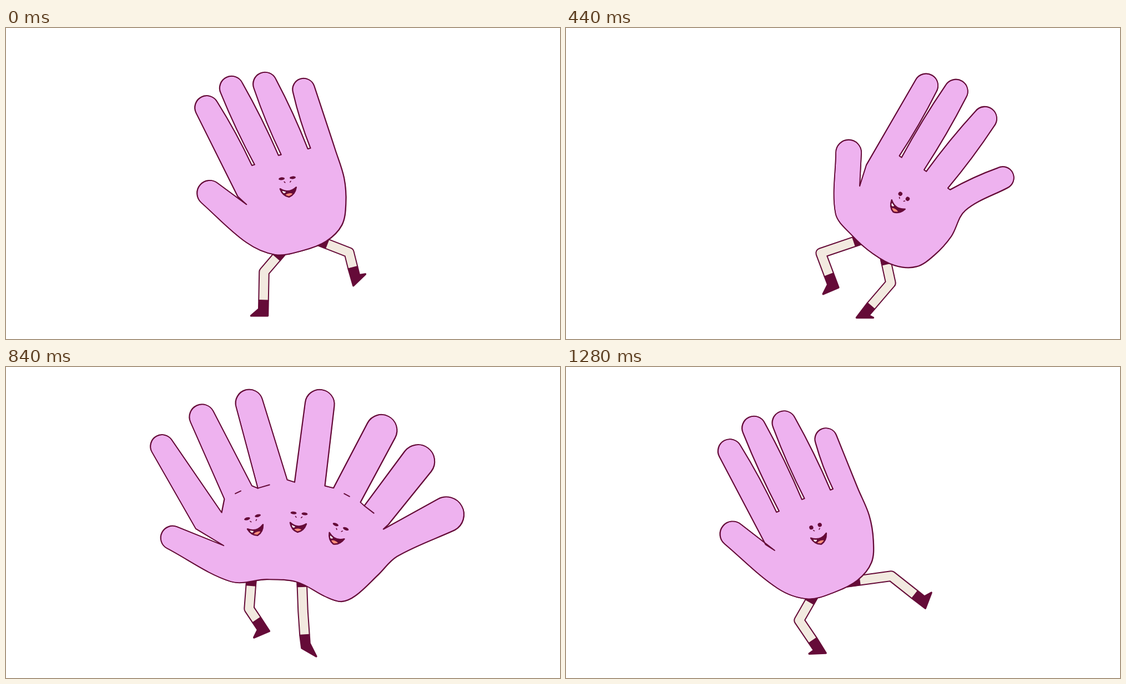
Write an HTML page with a canvas that moves like this. It is 998 by 561 pixels and loops after 1360 ms.

```html
<!DOCTYPE html>
<html lang="en">
<head>
<meta charset="utf-8">
<title>Walking hand</title>
<style>
html, body { margin: 0; width: 100%; height: 100%; overflow: hidden; background: #fff; }
canvas { display: block; width: 100vw; height: 100vh; }
</style>
</head>
<body>
<canvas id="stage"></canvas>
<script>
const W = 998, H = 561, LOOP = 1360;
const INK = '#650b38', SKIN = '#eeb2ef', BONE = '#f2eae0', TONGUE = '#ff8f7c';
const canvas = document.getElementById('stage');
const ctx = canvas.getContext('2d');
const ratio = window.devicePixelRatio || 1;
canvas.width = W * ratio;
canvas.height = H * ratio;

const rad = deg => deg * Math.PI / 180;
const add = (p, d, n) => [p[0] + d[0] * n, p[1] + d[1] * n];
const gap = (a, b) => Math.hypot(b[0] - a[0], b[1] - a[1]);
const unit = (a, b) => [(b[0] - a[0]) / (gap(a, b) || 1), (b[1] - a[1]) / (gap(a, b) || 1)];
const heading = deg => [Math.cos(rad(deg)), Math.sin(rad(deg))];
const place = ([x, y], [ox, oy], deg) => {
  const [c, s] = heading(deg);
  return [ox + x * c - y * s, oy + x * s + y * c];
};

// Blend numbers, lists and whole poses alike.
function mix(a, b, k) {
  if (typeof a === 'number') return a + (b - a) * k;
  if (Array.isArray(a)) return a.map((v, i) => mix(v, b[i], k));
  return Object.fromEntries(Object.keys(a).map(n => [n, mix(a[n], b[n], k)]));
}

// The hand hangs on the gap between its middle fingers (at). A pose gives the tilt,
// the finger angles and lengths, the height of the thumb, the face (x, y, roll)
// and for each leg the knee, ankle and direction of the sole.
const start = {
  at: [493, 229], tilt: -16.6, bend: [-12, -9.6, -7, -0.5], stretch: 0.95, little: 111, thumb: 30,
  face: [1, 44, 11], squint: 1,
  legs: [[465, 440, 464, 492, 180], [618, 405, 625, 433, -44]]
};
const upright = {
  at: [553, 218], tilt: 10.6, bend: [-15, -3.7, 2.5, 11], stretch: 0.93, little: 102, thumb: 57,
  face: [-4, 57, 0], squint: 0,
  legs: [[485, 430, 475, 474, 176], [571, 428, 559, 482, -25]]
};
const lean = {
  at: [647, 257], tilt: 33.5, bend: [-3.5, -3, 4.5, 32], stretch: 1, little: 90, thumb: 49,
  face: [-6, 60, 1], squint: 0,
  legs: [[459, 406, 474, 446, 157], [585, 460, 549, 502, 0]]
};
const reach = {
  at: [684, 313], tilt: 50, bend: [-1.6, -1, 10, 24.6], stretch: 1.06, little: 115, thumb: 38,
  face: [-9, 48, 0], squint: 0,
  legs: [[479, 411, 492, 442, 155], [582, 480, 551, 503, 0]]
};
const kick = {
  at: [390, 229], tilt: -37.3, bend: [-7.8, -3.3, 2.7, 3], stretch: 1, little: 89, thumb: 13,
  face: [-21, 51, 3], squint: 0,
  legs: [[427, 460, 447, 499, 183], [551, 342, 583, 348, -80]]
};
const settle = {
  at: [427, 238], tilt: -22.5, bend: [-5.8, -3, -2.5, 2], stretch: 1.015, little: 94, thumb: 10,
  face: [2, 54, 5], squint: 0,
  legs: [[420, 457, 445, 494, 178], [586, 377, 629, 411, -69]]
};
const smear = {
  caps: [[281, 143], [353, 90], [438, 65], [565, 67], [676, 114], [742, 170], [793, 266]],
  roots: [[365, 277], [418, 226], [480, 211], [547, 211], [614, 231], [667, 267], [692, 317]],
  palm: [[670, 375], [630, 412], [604, 423], [575, 414], [525, 388], [470, 383], [405, 387]],
  faces: [[444, 271, -16], [528, 264, 5], [603, 288, 23]],
  hips: [[442, 384], [533, 386]],
  legs: [[438, 436, 452, 457, 157], [535, 440, 538, 484, 30]]
};

// Swing the hand around a pivot with the feet left in place.
function turn(p, deg, pivot) {
  const rel = add(p.at, pivot, -1);
  return { ...p, tilt: p.tilt + deg, at: place(rel, pivot, deg) };
}

function trace(pts, width, color) {
  ctx.beginPath();
  pts.forEach(p => ctx.lineTo(...p));
  ctx.lineWidth = width;
  ctx.strokeStyle = color;
  ctx.stroke();
}

function drawLeg(hip, [kx, ky, ax, ay, sole]) {
  const knee = [kx, ky], ankle = [ax, ay];
  const thigh = unit(hip, knee), shin = unit(knee, ankle), toward = heading(sole);
  const root = add(hip, thigh, -14), bone = [root, knee, ankle];
  ctx.lineCap = 'butt';
  ctx.lineJoin = 'round';
  trace(bone, 19.5, INK);
  trace(bone, 15.5, BONE);
  trace([root, add(hip, thigh, 11)], 19, INK);

  const across = [-shin[1], shin[0]];
  const side = toward[0] * across[0] + toward[1] * across[1] > 0 ? 8 : -8;
  const heel = add(add(ankle, shin, 27), toward, -8);
  const front = add(ankle, across, side);
  ctx.beginPath();
  [add(ankle, across, -side), front, add(front, shin, 15), add(heel, toward, 30), heel]
    .forEach(p => ctx.lineTo(...p));
  ctx.closePath();
  ctx.fillStyle = ctx.strokeStyle = INK;
  ctx.lineWidth = 3.5;
  ctx.fill();
  ctx.stroke();
}

// Angle at which a line from p touches a round cap.
function touch({ cap, r }, p, side) {
  return Math.atan2(p[1] - cap[1], p[0] - cap[0]) + side * Math.acos(Math.min(1, r / gap(cap, p)));
}

function smooth(path, pts) {
  const dir = pts.map((p, i) => unit(pts[Math.max(0, i - 1)], pts[Math.min(pts.length - 1, i + 1)]));
  for (let i = 0; i + 1 < pts.length; i++) {
    const h = gap(pts[i], pts[i + 1]) / 3;
    path.bezierCurveTo(...add(pts[i], dir[i], h), ...add(pts[i + 1], dir[i + 1], -h), ...pts[i + 1]);
  }
}

// Side of a finger, swelling outwards by the given amount.
function edge(path, a, b, swell) {
  const d = unit(a, b);
  path.quadraticCurveTo(...add(mix(a, b, 0.5), [d[1], -d[0]], swell * 2), ...b);
}

// Digits run clockwise from the thumb, the palm from the last digit back to it.
function drawHand(digits, palm, swell) {
  const path = new Path2D();
  const last = digits.length - 1;
  let first, end;
  digits.forEach((g, i) => {
    const a = touch(g, g.left, 1), b = touch(g, g.right, -1);
    const up = add(g.cap, [Math.cos(a), Math.sin(a)], g.r);
    end = add(g.cap, [Math.cos(b), Math.sin(b)], g.r);
    if (i) {
      path.lineTo(...g.left);
      edge(path, g.left, up, i > 1 ? swell : 0);
    } else first = up;
    path.arc(...g.cap, g.r, a, b);
    if (i < last) edge(path, end, g.right, i ? swell : 0);
  });
  smooth(path, [end, ...palm, first]);
  ctx.fillStyle = SKIN;
  ctx.strokeStyle = INK;
  ctx.lineJoin = ctx.lineCap = 'round';
  ctx.fill(path);
  ctx.lineWidth = 1.8;
  ctx.stroke(path);
  ctx.translate(0.6, 0.5);
  ctx.lineWidth = 1.3;
  ctx.stroke(path);
  ctx.translate(-0.6, -0.5);
}

function blob(x, y, rx, ry, color) {
  ctx.beginPath();
  ctx.ellipse(x, y, rx, ry, 0, 0, Math.PI * 2);
  ctx.fillStyle = color;
  ctx.fill();
}

function drawFace([x, y, roll], squint) {
  ctx.save();
  ctx.translate(x, y);
  ctx.rotate(rad(roll));
  for (const s of [-1, 1]) {
    blob(s * (8 + squint * 2), 0, 3.7 + squint * 1.8, 3.7 - squint * 1.2, INK);
    trace([[s * 4.5, 7.5], [s * 6, 6]], 1.6, INK);
  }
  const mouth = new Path2D('M-14.5 18 Q0 29 14.5 18 Q11 31 0 34 Q-11 31 -14.5 18Z');
  ctx.fillStyle = ctx.strokeStyle = INK;
  ctx.fill(mouth);
  ctx.save();
  ctx.clip(mouth);
  blob(1, 33, 9, 5.5, TONGUE);
  blob(-8, 23.5, 3, 3, '#fff');
  ctx.restore();
  ctx.lineWidth = 2.6;
  ctx.stroke(mouth);
  ctx.restore();
}

function drawPose(p) {
  const t = p.tilt;
  const hips = [[-43 + 0.4 * t, 170], [28, 172]];
  hips.forEach((h, i) => drawLeg(place(h, p.at, t), p.legs[i]));

  // The soft heel of the hand sways with the tilt.
  const heel = [-100, 140 + 0.4 * t];
  const palm = [[99, 20], [101, 73], [92, 118], [75, 153], [40, 173], [-5, 177], [-55, 170], heel]
    .map(([x, y]) => [x + 0.0015 * t * y, y]);
  const webs = [-51, 0, 54].map(x => [x, Math.abs(x) / 14]);
  const lefts = [[-94, 50], ...webs.map(w => add(w, [1, 0], 2.5))];
  const rights = [...webs.map(w => add(w, [1, 0], -2.5)), palm[0]];
  const roots = [[-75, 6], [-25, 0], [27, 0], [76, 10]];
  const lengths = [...[135, 150, 138].map(n => n * p.stretch), p.little];
  const fingers = roots.map((root, i) => ({
    cap: add(root, heading(p.bend[i] - 90), lengths[i]),
    r: i < 3 ? 21.5 : 20, left: lefts[i], right: rights[i]
  }));
  const thumb = { cap: [-138 + 0.15 * t, p.thumb], r: 23, left: palm[7], right: [-83, 75 + 0.4 * t] };

  ctx.save();
  ctx.translate(...p.at);
  ctx.rotate(rad(t));
  drawHand([thumb, ...fingers], palm, 2);
  drawFace(p.face, p.squint);
  ctx.restore();
}

function drawSmear() {
  const { caps, roots, palm, faces, hips, legs } = smear;
  hips.forEach((h, i) => drawLeg(h, legs[i]));
  const fingers = caps.map((cap, i) => {
    const d = unit(roots[i], cap), across = [-d[1], d[0]];
    return { cap, r: 21 + 1.8 * i, left: add(roots[i], across, -27.5), right: add(roots[i], across, 27.5) };
  });
  const thumb = { cap: [300, 308], r: 21.5, left: palm[palm.length - 1], right: [392, 322] };
  drawHand([thumb, ...fingers], [fingers[6].right, ...palm], 0);
  fingers.forEach(({ left, right }, i) => {
    const from = [0, 0.4, 0][i % 3], to = [0, 0.6, 0.4][i % 3];
    if (to) trace([mix(left, right, from), mix(left, right, to)], 2, INK);
  });
  faces.forEach(f => drawFace(f, 1));
}

const pivot = [560, 430];
const back = { ...mix(settle, kick, 0.4), legs: mix(smear.legs, kick.legs, 0.6) };
const far = turn(kick, -14, [439, 400]);
far.legs = [kick.legs[0], [543, 324, 573, 320, -94]];

const out = k => 1 - (1 - k) * (1 - k);
const keys = [
  [40, start], [200, upright], [440, lean], [600, turn(reach, 0.6, pivot), out],
  [680, reach], [720, turn(reach, 7, pivot)], [760, turn(reach, -6, pivot)],
  [920, back], [1000, kick], [1200, far, out], [1280, settle], [1360, start]
];

// Drawings change on a 40 ms grid, with a few held for two ticks.
const held = [40, 560, 640, 800, 880, 960, 1160, 1240, 1320];
function tick(ms) {
  const t = Math.floor(ms / 40) * 40;
  return held.includes(t) ? t - 40 : t;
}

function render(ms) {
  const t = tick(ms);
  ctx.setTransform(ratio, 0, 0, ratio, 0, 0);
  ctx.fillStyle = '#fff';
  ctx.fillRect(0, 0, W, H);
  if (t === 840) return drawSmear();
  const i = Math.max(1, keys.findIndex(k => k[0] >= t));
  const [from, prev] = keys[i - 1], [to, next, ease] = keys[i];
  const k = Math.max(0, (t - from) / (to - from));
  drawPose(mix(prev, next, ease ? ease(k) : k));
}

let zero = null;
function loop(now) {
  if (zero === null) zero = now;
  render((now - zero) % LOOP);
  requestAnimationFrame(loop);
}
render(0);
requestAnimationFrame(loop);
</script>
</body>
</html>
```
